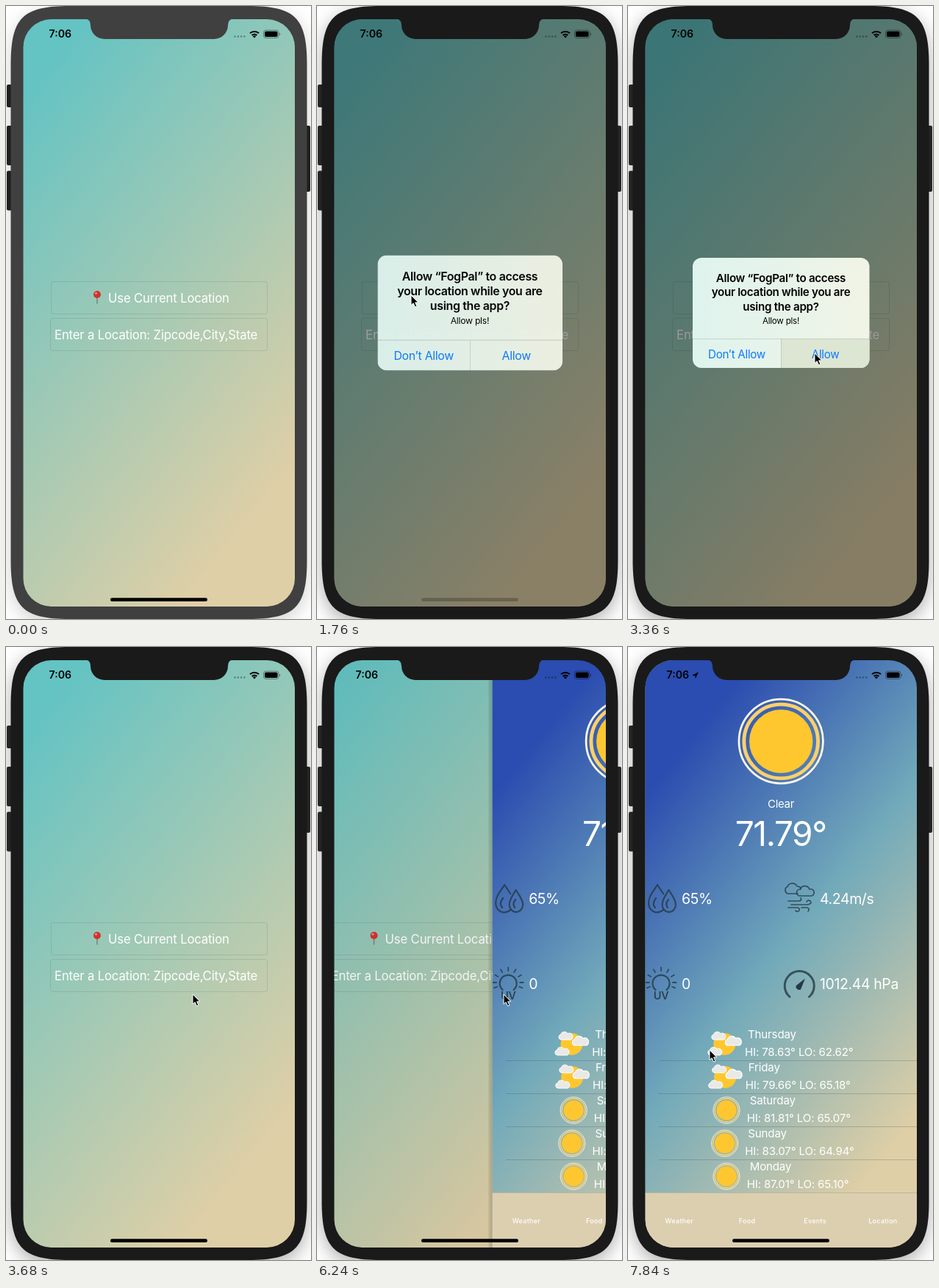
Animation of 415x835 px, one loop 8 s. Source, as an HTML page:

```html
<!DOCTYPE html>
<html lang="en">
<head>
<meta charset="utf-8">
<title>Weather app</title>
<style>
html, body { margin: 0; width: 100%; height: 100%; overflow: hidden; background: #fff; }
svg { display: block; width: 100%; height: 100%;
  --body: #404040; --button: #222; --shadow: rgba(0, 0, 0, .18); }
svg.active { --body: #1a1a1a; --button: #2a2a2a; --shadow: rgba(0, 0, 0, .32); }
text { font-family: Inter, "Open Sans", sans-serif; letter-spacing: -.02em; white-space: pre; }
.mid { text-anchor: middle; }
.loose text { letter-spacing: -.011em; }
.line { fill: none; stroke-linecap: round; stroke-linejoin: round; }
#device { fill: var(--body); filter: drop-shadow(0 7px 12px var(--shadow)); }
</style>
</head>
<body>
<svg id="stage" viewBox="0 0 415 835">
  <defs>
    <clipPath id="screen"><rect x="23.5" y="18" width="369.5" height="800" rx="38"/></clipPath>
    <linearGradient id="searchSky" gradientUnits="userSpaceOnUse" x1="72" y1="57" x2="550" y2="439">
      <stop stop-color="#64c3c3"/><stop offset="1" stop-color="#dfcfa6"/>
    </linearGradient>
    <linearGradient id="weatherSky" gradientUnits="userSpaceOnUse" x1="112" y1="89" x2="555" y2="443">
      <stop stop-color="#2b4cb0"/><stop offset=".49" stop-color="#72aaba"/><stop offset="1" stop-color="#dfcfa6"/>
    </linearGradient>
    <linearGradient id="frost"><stop stop-color="#e1f6f0"/><stop offset="1" stop-color="#f3f6e8"/></linearGradient>
    <linearGradient id="edge"><stop stop-opacity=".06"/><stop offset="1" stop-opacity=".18"/></linearGradient>
    <clipPath id="alertShape"><rect x="88" y="343" width="240.5" height="150" rx="12"/></clipPath>
  </defs>

  <g fill="var(--button)">
    <rect x="1" y="107" width="10" height="31" rx="2"/>
    <rect x="1" y="163" width="10" height="54" rx="2"/>
    <rect x="1" y="224.5" width="10" height="54" rx="2"/>
    <rect x="404" y="163" width="10" height="90" rx="2"/>
  </g>
  <path id="device" d="M6.5 80c0-64 16-80 80-80h243c64 0 80 16 80 80v675c0 64-16 80-80 80h-243c-64 0-80-16-80-80z"/>

  <g clip-path="url(#screen)">
    <g id="search">
      <rect x="23" y="18" width="371" height="800" fill="url(#searchSky)"/>
      <g fill="none" stroke="#46645a" stroke-opacity=".18">
        <rect x="61.5" y="375.5" width="294" height="44" rx="3"/>
        <rect x="60.5" y="425.5" width="295" height="44" rx="3"/>
      </g>
      <path d="M124 396v9" class="line" stroke="#7d8583" stroke-width="1.6"/>
      <circle cx="124" cy="393" r="5" fill="#d5312f"/>
      <circle cx="122.5" cy="391.3" r="1.5" fill="#f0928a"/>
      <g class="loose" fill="#fff" font-size="16.75">
        <text x="139" y="403.5">Use Current Location</text>
        <text x="66" y="453.5">Enter a Location: Zipcode,City,State</text>
      </g>
    </g>
    <rect id="pushDim" x="23" y="18" width="371" height="800"/>

    <g id="weather">
      <rect x="18" y="18" width="5.5" height="800" fill="url(#edge)"/>
      <rect x="23.5" y="18" width="371" height="800" fill="url(#weatherSky)"/>
      <g id="bigSun"></g>
      <g fill="#fff">
        <text class="mid" x="208" y="218.5" font-size="15">Clear</text>
        <text class="mid" x="207.8" y="270.8" font-size="46" style="letter-spacing:-.03em">71.79°</text>
        <g font-size="19.5">
          <text x="73" y="350">65%</text>
          <text x="261" y="350">4.24m/s</text>
          <text x="73" y="465.5">0</text>
          <text x="261" y="465.5">1012.44 hPa</text>
        </g>
      </g>
      <g class="line" stroke="#253a45" stroke-opacity=".8" stroke-width="2.2">
        <path d="M40 324C34 333 28 340 28 348.5C28 357 34 361.5 40 361.5Q45 361 48 358M40 324Q44 330 48 336"/>
        <path d="M55.500 331C51 338 46.5 344 46.5 351a9.2 10 0 0 0 18.500 0C65 344 60 338 55.500 331z"/>
        <path d="M38 342q-6 8-1 13M55 344q-5 6-1 11"/>
        <path d="M37.5 467A11.500 11.500 0 1 1 52.5 467"/>
        <path id="rays" stroke-width="1.8"/>
        <g stroke-width="1.7">
          <path d="M218 336a5 5 0 0 1-1-9.500a7 7 0 0 1 13-.5q5 0 5 4M218 336h13"/>
          <path d="M234 339a4.500 4.500 0 0 1 0-9a7 7 0 0 1 13 0a4.500 4.500 0 0 1 3 9z"/>
          <path d="M218 346h15q4-1 2-4M222 351h22q7-1 4-5q-3-2-5 1M218 355h13q4 2 1 5q-3 1-4-1M236 355h8q4 2 1 5"/>
        </g>
        <path d="M220 476.500A20 20 0 1 1 246.500 476.500" stroke-width="3"/>
        <path d="M241 451.500L228.500 461.500a4.500 4.500 0 0 0 6.500 5z" fill="#253a45" stroke="none"/>
      </g>
      <text class="mid" x="45" y="479.5" font-size="14.5" font-weight="500" fill="#253a45">UV</text>
      <g id="forecast"></g>
      <rect x="23.5" y="743" width="371" height="76" fill="#dccfb0"/>
      <path d="M23.5 743.5H394" stroke="#8a9088" stroke-opacity=".4"/>
      <g id="tabs" fill="#fff" font-size="9" font-weight="500"></g>
    </g>

    <g id="status">
      <text id="clock" y="43" font-size="14.2" font-weight="600" style="letter-spacing:0">7:06</text>
      <path id="arrow" d="M87 38.7L96 34L91.8 43L91.3 38.9z"/>
      <path d="M311.5 41.5h14" class="line" stroke="#000" stroke-opacity=".35" stroke-width="2.6" stroke-dasharray="0 4.3"/>
      <path d="M332 37a9 9 0 0 1 12 0M334.6 39.8a5.500 5.500 0 0 1 6.800 0" fill="none" stroke="#000" stroke-width="2.1"/>
      <path d="M338 43.500l-2.200-2.300a3.400 3.400 0 0 1 4.400 0z"/>
      <rect x="350.5" y="33" width="20.5" height="10.5" rx="3" fill="none" stroke="#000" stroke-opacity=".4"/>
      <rect x="352" y="34.5" width="17.5" height="7.5" rx="1.8"/>
      <path d="M372 36.500q2.500 1.800 0 3.600z" opacity=".45"/>
    </g>
    <rect id="home" x="142" y="806.3" width="132" height="4.7" rx="2.35"/>
    <rect id="alertDim" x="23" y="18" width="371" height="800"/>

    <g id="alert">
      <g clip-path="url(#alertShape)">
        <rect x="88" y="343" width="241" height="150" fill="url(#frost)" opacity=".98"/>
        <rect id="pressed" x="208.5" y="453.5" width="121" height="40" fill="#dde5d3"/>
        <path d="M88 453.5H329M208.5 453.5V493" stroke="#3c3c43" stroke-opacity=".18"/>
      </g>
      <g class="mid">
        <g font-size="15.2" font-weight="600">
          <text x="208" y="375.5">Allow “FogPal” to access</text>
          <text x="208" y="395">your location while you are</text>
          <text x="208" y="414.5">using the app?</text>
        </g>
        <text x="208" y="432.5" font-size="11.6">Allow pls!</text>
        <g font-size="15.2" fill="#0a7bff">
          <text x="148" y="479.5">Don’t Allow</text>
          <text x="268.5" y="479.5">Allow</text>
        </g>
      </g>
    </g>
  </g>
  <path d="M107 17.500q8 0 8 8.500a19 19 0 0 0 19 19h149a19 19 0 0 0 19-19q0-8.500 8-8.500z" fill="var(--body)"/>
  <path id="cursor" d="M0 0V13.500L3.100 10.700L5.500 16L7.900 15L5.600 9.900H9.800z" stroke="#fff" stroke-width="1" stroke-linejoin="round"/>
</svg>

<script>
const LOOP = 8000, STEP = 160;
const ALERT_IN = 1545, ALERT_OUT = 3400, PUSH = 6130;
const el = id => document.getElementById(id);
const set = (id, attrs) => {
  for (const name in attrs) el(id).setAttribute(name, attrs[name]);
};
const clamp = v => Math.max(0, Math.min(1, v));

// Critically damped spring running from 0 to 1
const spring = ms => {
  const x = Math.max(0, ms) * .013;
  const p = 1 - (1 + x) * Math.exp(-x);
  return p > .999 ? 1 : p;
};

const sun = `<circle r="58.3" fill="none" stroke="#fff8e6" stroke-width="2.8"/>
  <circle r="51.3" fill="none" stroke="#fdd06a" stroke-width="5"/>
  <circle r="44" fill="#ffc72f"/>`;
const cloud = (x, y, s) => `<path transform="translate(${x} ${y}) scale(${s})"
  d="M-6 5a3.700 3.700 0 0 1-.5-7.200a5.300 5.300 0 0 1 9.500-1.300a4.400 4.400 0 0 1 4.500 8.500z"
  fill="#e9e9e6" stroke="#fff" stroke-width="1"/>`;
const cloudySun = `<circle r="15" fill="#ffc72f"/>
  <g class="drift">${cloud(-8, -11, 1)}${cloud(12, -4, 1.15)}${cloud(-13, 10, 1)}</g>`;

const days = [
  ["Thursday", 0, "78.63", "62.62", true],
  ["Friday", .8, "79.66", "65.18", true],
  ["Saturday", 2.7, "81.81", "65.07"],
  ["Sunday", .3, "83.07", "64.94"],
  ["Monday", 2.7, "87.01", "65.10"]
];
el("forecast").innerHTML = days.map(([day, dx, high, low, cloudy], i) => {
  const y = 45 * i, icon = cloudy ? cloudySun : `<g class="pulse">${sun}</g>`;
  const divider = i < 4 ? `<path d="M42 ${563.5 + y}H394" stroke="#3c3c43" stroke-opacity=".24"/>` : "";
  return `<g transform="translate(${131.3 + dx} ${541 + y}) scale(${cloudy ? 1 : .315})">${icon}</g>
    <g class="loose" fill="#fff" font-size="15.1">
      <text x="${163 + dx}" y="${533.3 + y}">${day}</text>
      <text x="${159 + dx}" y="${557 + y}">HI: ${high}° LO: ${low}°</text>
    </g>${divider}`;
}).join("");

el("bigSun").setAttribute("transform", "translate(208.2 128.5)");
el("bigSun").innerHTML = `<g class="pulse">${sun}</g>`;
el("tabs").innerHTML = ["Weather", "Food", "Events", "Location"].map((name, i) =>
  `<text class="mid" style="letter-spacing:.03em" x="${69.7 + 92.4 * i}" y="785">${name}</text>`).join("");

const ray = i => {
  const a = Math.PI * (1 + i / 6), at = r => `${45 + r * Math.cos(a)} ${457 + r * Math.sin(a)}`;
  return `M${at(16)}L${at(20.5)}`;
};
el("rays").setAttribute("d", [-.7, 0, 1, 2, 3, 4, 5, 6, 6.7].map(ray).join(""));

// time, x, y of the pointer tip
const pointer = [
  [320, 36, 437], [480, 105, 402], [640, 128, 394], [2080, 128, 394], [2400, 254, 473],
  [6480, 254, 473], [7040, 98, 520], [7360, 98, 520], [7840, 111, 549]
];
function pointerAt(t) {
  const i = pointer.findIndex(k => k[0] > t);
  if (i < 0) return pointer.at(-1).slice(1);
  if (i === 0) return pointer[0].slice(1);
  const [a, b] = [pointer[i - 1], pointer[i]];
  const u = (t - a[0]) / (b[0] - a[0]), e = u * u * (3 - 2 * u);
  return [a[1] + (b[1] - a[1]) * e, a[2] + (b[2] - a[2]) * e];
}

function render(t) {
  el("stage").classList.toggle("active", t >= 1280);

  const shown = spring(t - ALERT_IN);
  const leaving = clamp((t - ALERT_OUT) / 240);
  const visible = Math.min(1, shown * 1.25) * (1 - leaving);
  const scale = 1.2 - .2 * shown;
  set("alert", {
    opacity: visible,
    transform: `translate(208.25 418) scale(${scale}) translate(-208.25 -418)`
  });
  set("alertDim", { opacity: .4 * visible });
  set("pressed", { opacity: t >= 2720 ? 1 : 0 });
  set("home", { opacity: 1 - shown * (1 - leaving) });

  const push = spring(t - PUSH);
  set("search", { transform: `translate(${-111 * push} 0)` });
  set("pushDim", { opacity: .1 * push });
  set("weather", {
    transform: `translate(${370 * (1 - push)} 0)`,
    visibility: push > 0 ? "visible" : "hidden"
  });
  set("clock", { x: push > 0 ? 52.5 : 58.5 });
  set("arrow", { opacity: clamp((t - 6240) / 320) });

  const wave = Math.cos((t - 7040) / 1600 * 2 * Math.PI);
  document.querySelectorAll(".pulse").forEach(g =>
    g.setAttribute("transform", `scale(${.993 + .011 * wave})`));
  document.querySelectorAll(".drift").forEach(g =>
    g.setAttribute("transform", `translate(${.4 * wave} 0)`));

  const [x, y] = pointerAt(t);
  set("cursor", { transform: `translate(${x} ${y})`, opacity: t < 320 ? 0 : 1 });
}

const start = performance.now();
function frame() {
  const t = (performance.now() - start) % LOOP;
  render(Math.floor(t / STEP) * STEP);
  requestAnimationFrame(frame);
}
frame();
</script>
</body>
</html>
```
